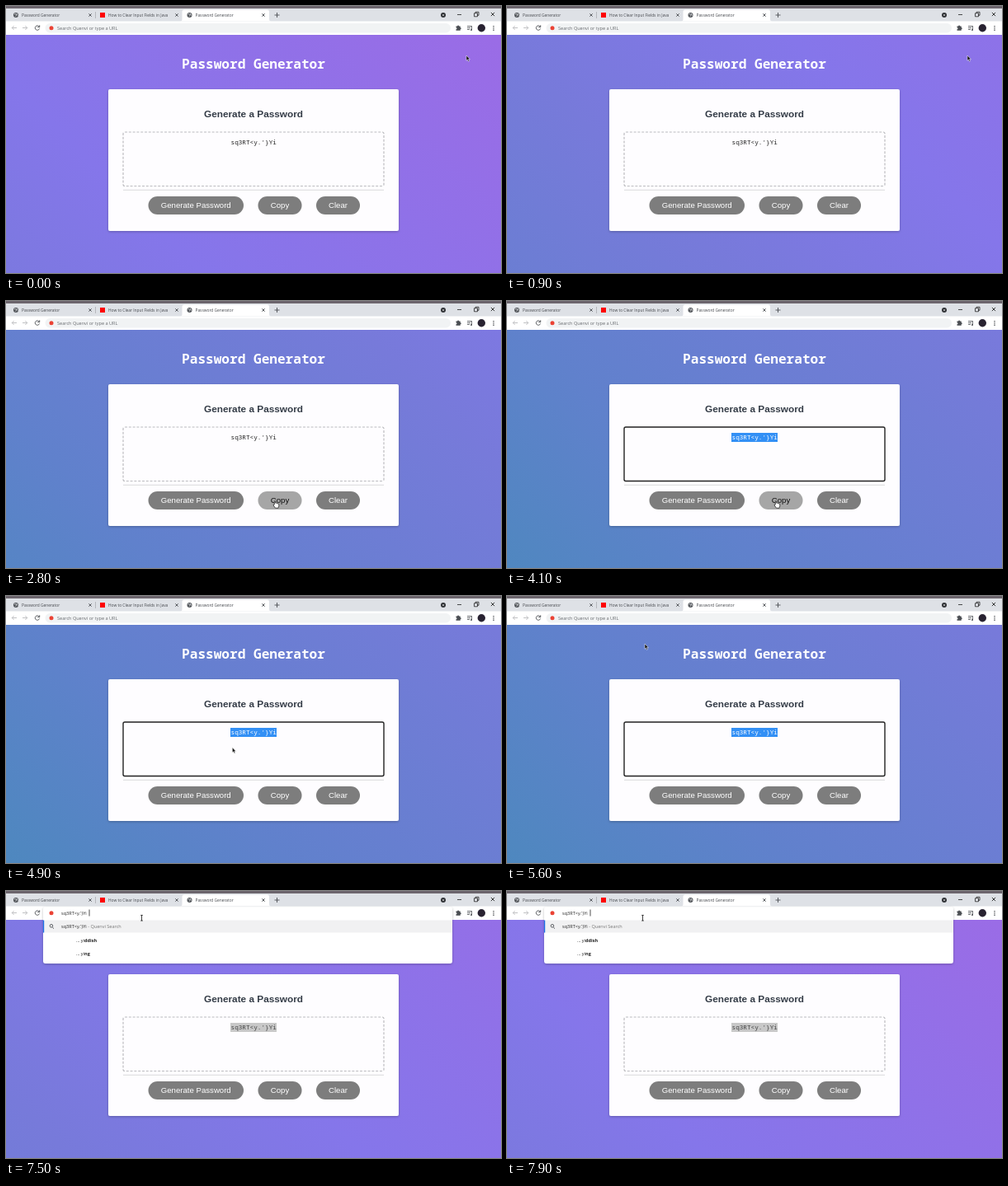
An HTML page for the animation above (8 s loop, 600 px wide and 324 px high).

```html
<!DOCTYPE html>
<html lang="en">
<head>
<meta charset="utf-8">
<title>Password Generator</title>
<style>
  html, body { margin: 0; width: 100%; height: 100%; overflow: hidden; }
  svg { display: block; width: 600px; height: 324px; }
  .ui { font-family: "Open Sans", "Noto Sans", sans-serif; }
  .tab { font-size: 4.85px; fill: #45484d; }
  .bar { font-size: 5.55px; }
  .mono { font-family: "Noto Sans Mono", "DejaVu Sans Mono", monospace; text-anchor: middle; }
  .arial { font-family: "Liberation Sans", Arial, sans-serif; text-anchor: middle; }
  .line { fill: none; stroke: #4a4d52; stroke-width: .9; }
</style>
</head>
<body>
<svg viewBox="0 0 600 324" xmlns="http://www.w3.org/2000/svg">
  <defs>
    <linearGradient id="sky" gradientUnits="userSpaceOnUse">
      <stop offset=".12" stop-color="#4d88be"/>
      <stop offset=".22" stop-color="#6081cc"/>
      <stop offset=".37" stop-color="#777ada"/>
      <stop offset=".47" stop-color="#8576ea"/>
      <stop offset=".65" stop-color="#9a6ce6"/>
    </linearGradient>
    <linearGradient id="fade">
      <stop stop-color="#dee1e6" stop-opacity="0"/>
      <stop offset="1" stop-color="#dee1e6"/>
    </linearGradient>
    <filter id="shadow" x="-10%" y="-10%" width="120%" height="130%">
      <feDropShadow dx="0" dy="1" stdDeviation="1.5" flood-opacity=".25"/>
    </filter>
    <g id="globe">
      <circle r="3" fill="#505358"/>
      <path d="M-2-1Q0-2 .3-.6T-.4 1.7M1-2Q.8 0 2.4.4" fill="none" stroke="#e8eaed" stroke-width=".8"/>
    </g>
    <path id="cross" d="M-1.7-1.7 1.7 1.7M1.7-1.7-1.7 1.7"/>
  </defs>

  <!-- page -->
  <rect y="35" width="600" height="289" fill="url(#sky)"/>
  <text class="mono" x="300" y="76" font-size="16.1" font-weight="700" fill="#fff">Password Generator</text>
  <rect x="124" y="101" width="352" height="172" rx="2" fill="#fefdff" filter="url(#shadow)"/>
  <text class="arial" x="300" y="134.5" font-size="11.8" font-weight="700" fill="#343c47">Generate a Password</text>
  <rect id="field" x="142" y="153" width="316" height="65.5" rx="2" fill="none"/>
  <rect id="mark" x="272" y="160" width="56" height="11"/>
  <text id="password" class="mono" x="300.2" y="168.4" font-size="7.7">sq3RT&lt;y.'}Yi</text>
  <path d="M142 223.3H458" stroke="#d2d2d4" stroke-width=".8"/>
  <g id="buttons" class="arial" font-size="9.62"></g>

  <!-- browser -->
  <g class="ui">
    <rect width="600" height="35" fill="#fff"/>
    <rect width="600" height="18.5" fill="#dee1e6"/>
    <rect width="600" height="3" fill="#6c656d"/>
    <path d="M211 18.5q2.5 0 2.5-2.5V7q0-2.5 2.5-2.5H316.500q2.500 0 2.500 2.500V16q0 2.500 2.500 2.500Z" fill="#fff"/>
    <use href="#globe" x="12" y="11"/>
    <use href="#globe" x="222.500" y="11"/>
    <rect x="114" y="8" width="6" height="6" fill="#f00"/>
    <text class="tab" x="19" y="12.800">Password Generator</text>
    <text class="tab" x="124" y="12.800">How to Clear Input Fields in Java</text>
    <text class="tab" x="229.500" y="12.800">Password Generator</text>
    <rect x="196" y="6" width="12" height="10" fill="url(#fade)"/>
    <rect x="208" y="6" width="3" height="10" fill="#dee1e6"/>
    <g class="line">
      <use href="#cross" x="102" y="11"/>
      <use href="#cross" x="207" y="11"/>
      <use href="#cross" x="312" y="11"/>
      <path d="M108.500 7V15" stroke="#9a9da2" stroke-width=".6"/>
      <path d="M325.500 11H331.500M328.500 8V14"/>
      <path d="M547 10.500H552M567.500 8.800H571.500V12.800H567.500ZM569 8.800V7.300H573V11.300H571.500" stroke="#222" stroke-width=".8"/>
      <use href="#cross" x="590" y="10" transform="translate(590 10) scale(1.25) translate(-590 -10)" stroke="#222" stroke-width=".7"/>
    </g>
    <circle cx="530" cy="11" r="3" fill="#303236"/>
    <path d="M528.700 10.400H531.300L530 12.200Z" fill="#fff"/>
    <g class="line">
      <path d="M13 26.500H7.300M9.700 24 7.200 26.500 9.700 29M20 26.500H25.700M23.300 24 25.800 26.500 23.300 29" stroke="#babcbe"/>
      <path d="M40.300 25.200A2.700 2.700 0 1 0 40.500 27.500M40.700 23.300V25.700H38.300"/>
      <path d="M559 24.500H565M559 26.500H563M559 28.500H562M564.500 25V29" stroke-width=".8"/>
    </g>
    <path d="M545.500 24.500h1.600a1 1 0 0 1 2 0h1.600v1.700a1 1 0 0 1 0 2v1.600h-5.200v-1.600a1 1 0 0 0 0-2Z" fill="#4a4d52"/>
    <circle cx="564" cy="29" r="1" fill="#4a4d52"/>
    <circle cx="576.300" cy="26.700" r="4.700" fill="#282231"/>
    <path d="M591 24V30" stroke="#4a4d52" stroke-width="1.300" stroke-dasharray="1.300 1"/>
    <rect id="omnibox" x="47.500" y="21" width="491.500" height="11.500" rx="5.750"/>

    <g id="results">
      <path d="M45 22q0-2.500 2.500-2.500H538.500q2.500 0 2.500 2.500V85q0 3-3 3H48q-3 0-3-3Z" fill="#fff" filter="url(#shadow)"/>
      <rect x="45" y="35.500" width="496" height="15" fill="#f1f1f2"/>
      <rect x="45" y="35.500" width="1.200" height="15" fill="#1a73e8"/>
      <path class="line" d="M56.300 44 58 45.700M56.700 42.300a1.800 1.800 0 1 1-3.600 0 1.800 1.800 0 0 1 3.600 0" stroke-width=".8"/>
      <g class="bar" fill="#222">
        <text x="67" y="28.800">sq3RT&lt;y.'}Yi</text>
        <text x="67" y="45">sq3RT&lt;y.'}Yi <tspan fill="#777">- Quenvi Search</tspan></text>
        <text x="85" y="61.500">... yi<tspan font-weight="700">ddish</tspan></text>
        <text x="85" y="78">... yi<tspan font-weight="700">ng</tspan></text>
      </g>
    </g>
    <circle cx="55" cy="26.700" r="2.500" fill="#ea4335"/>
    <text id="hint" class="bar" x="62" y="28.800" fill="#696c70">Search Quenvi or type a URL</text>
    <path id="caret" d="M0 22.500V30.500" stroke="#222" stroke-width=".8"/>
  </g>

  <g id="pointer">
    <path id="arrow" d="M0 0V6.300L1.400 5 2.400 7.300 3.500 6.800 2.500 4.600H4.400Z" fill="#111" stroke="#fff" stroke-width=".5"/>
    <path id="hand" d="M1.300 5V.900Q2 0 2.700.900V3.200Q3.700 2.700 4.200 3.500 5.200 3.200 5.600 4 6.700 3.800 6.800 4.700V7L6 9.200H2.500L.200 6Q-.200 4.600 1.300 5Z" fill="#fff" stroke="#111" stroke-width=".7"/>
    <path id="beam" d="M-1.300-3.300H1.300M0-3.300V3.300M-1.300 3.300H1.300" stroke="#111" stroke-width=".8"/>
  </g>
</svg>
<script>
const LOOP = 8000, STEP = 100;
const SELECT = 3300, FOCUS = 6200, PASTE = 7300;
const el = id => document.getElementById(id);
const set = (node, attrs) => { for (const k in attrs) node.setAttribute(k, attrs[k]); };
const show = (id, on) => set(el(id), { display: on ? "inline" : "none" });

// Pointer way-points: time, x, y
const path = [[0, 558, 60], [900, 558, 60], [1700, 526, 77], [1900, 526, 77], [2600, 324, 242],
  [4600, 324, 242], [5400, 167, 58], [5800, 167, 58], [6100, 164.5, 32.7], [LOOP, 164.5, 32.7]];

const buttons = [["Generate Password", 172.5, 115.5], ["Copy", 305.5, 53], ["Clear", 376, 53]].map(([label, x, w]) => {
  const make = (tag, attrs) => {
    const node = document.createElementNS("http://www.w3.org/2000/svg", tag);
    set(node, attrs);
    return el("buttons").appendChild(node);
  };
  const box = make("rect", { x, y: 231, width: w, height: 22, rx: 11 });
  const text = make("text", { x: x + w / 2, y: 245.4 });
  text.textContent = label;
  return { box, text, x, w };
});

// CSS "ease": cubic-bezier(.25, .1, .25, 1)
function ease(x) {
  const bezier = (s, a, b) => 3 * s * (1 - s) ** 2 * a + 3 * s * s * (1 - s) * b + s ** 3;
  let lo = 0, hi = 1;
  for (let i = 0; i < 24; i++) {
    const mid = (lo + hi) / 2;
    if (bezier(mid, .25, .25) < x) lo = mid; else hi = mid;
  }
  return bezier(lo, .1, 1);
}

function pointerAt(t) {
  const i = path.findIndex(p => p[0] > t);
  const [t0, x0, y0] = path[i - 1], [t1, x1, y1] = path[i];
  const k = (t - t0) / (t1 - t0), s = k * k * (3 - 2 * k);
  return [x0 + (x1 - x0) * s, y0 + (y1 - y0) * s];
}

// The page shows a quarter of an oversized 45° gradient that slides back and forth.
function drawSky(t) {
  const turn = 5500, half = 7500;
  const away = t < turn ? 1 - ease(1 - (turn - t) / half) : ease((t - turn) / half);
  const start = -away * 1800 - 723, end = start + 3556;
  set(el("sky"), { x1: start / 2, y1: 35 - start / 2, x2: end / 2, y2: 35 - end / 2 });
}

function render(t) {
  drawSky(t);
  const selected = t >= SELECT, focused = t >= FOCUS, pasted = t >= PASTE;
  const active = selected && !focused;

  set(el("field"), active
    ? { stroke: "#222", "stroke-width": 1.4, "stroke-dasharray": "none" }
    : { stroke: "#bcbcc0", "stroke-width": 1.2, "stroke-dasharray": "3 1.8" });
  set(el("mark"), { fill: !selected ? "none" : active ? "#3390f5" : "#c8c8c8" });
  set(el("password"), { fill: active ? "#fff" : focused ? "#444" : "#222" });

  set(el("omnibox"), focused
    ? { fill: pasted ? "none" : "#fff", stroke: pasted ? "none" : "#6f9fe0", "stroke-width": 1.1 }
    : { fill: "#f1f3f4", stroke: "none" });
  show("hint", !focused);
  show("results", pasted);
  show("caret", focused);
  set(el("caret"), { transform: `translate(${pasted ? 101 : 62.5} 0)` });

  const [x, y] = pointerAt(t);
  let hovering = false;
  for (const b of buttons) {
    const over = x > b.x && x < b.x + b.w && y > 231 && y < 253;
    hovering ||= over;
    set(b.box, { fill: over ? "#a6a6a6" : "#7d7d7d" });
    set(b.text, { fill: over ? "#111" : "#fff" });
  }
  const typing = y < 35;
  set(el("pointer"), { transform: `translate(${x} ${y})` });
  show("hand", hovering);
  show("beam", typing);
  show("arrow", !hovering && !typing);
}

function tick() {
  render(Math.floor(performance.now() % LOOP / STEP) * STEP);
  requestAnimationFrame(tick);
}
tick();
</script>
</body>
</html>
```
